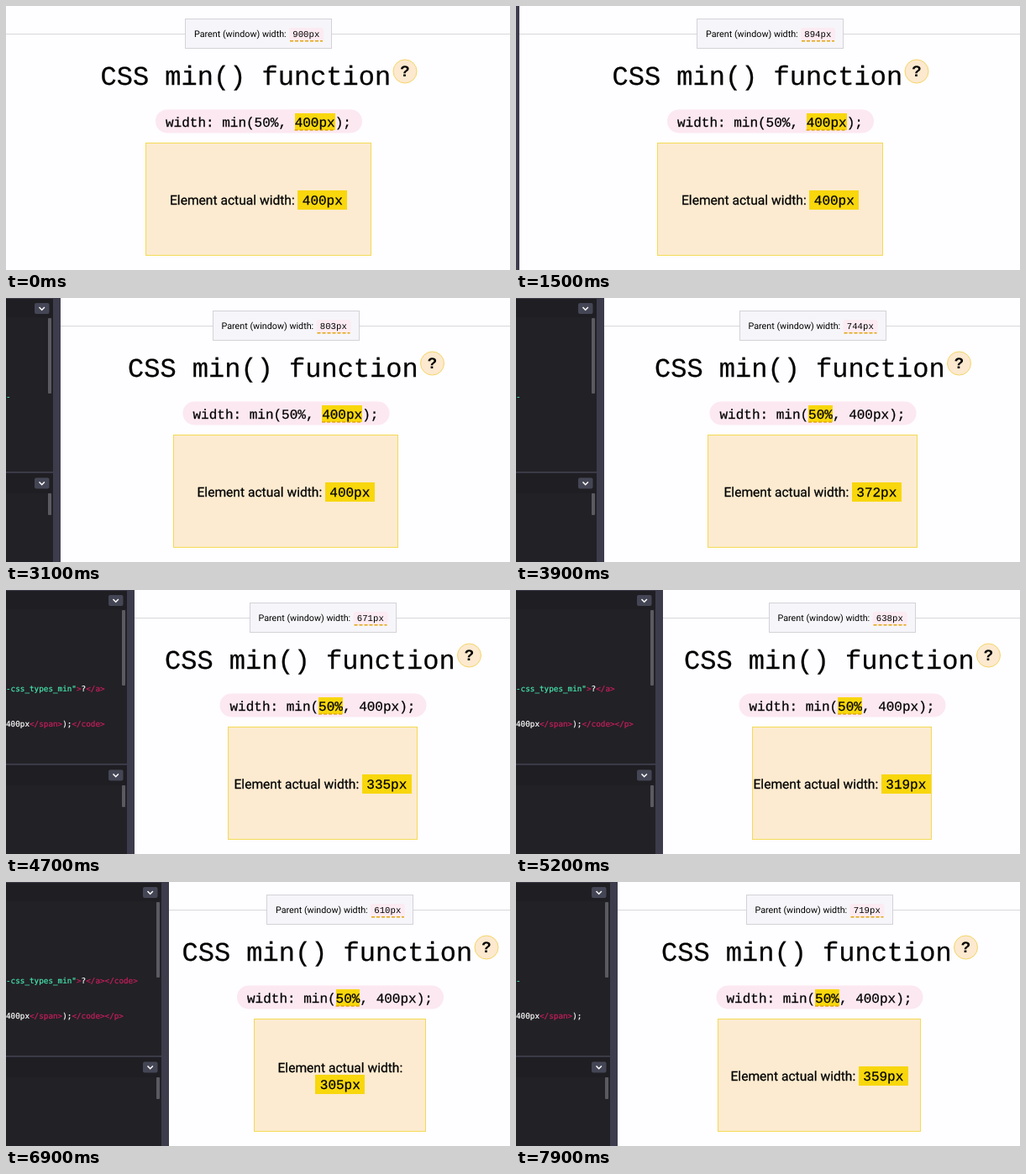
Write an HTML page that moves like this. It is 600 by 315 pixels and loops after 8000 ms.

```html
<!DOCTYPE html>
<html lang="en">
<head>
<meta charset="utf-8">
<title>CSS min() function</title>
<style>
  html, body { margin: 0; width: 100%; height: 100%; overflow: hidden; background: #fefdff; }
  svg { display: block; width: 600px; height: 315px; }
  text { fill: #000; white-space: pre; text-rendering: geometricPrecision; }
  .mono { font-family: "Liberation Mono", monospace; }
  .sans { font-family: Roboto, sans-serif; }
  .medium { stroke: #000; stroke-width: .25px; }
  .crisp { shape-rendering: crispEdges; }
  .source { font: 9.3px "DejaVu Sans Mono", monospace; stroke-width: .2px; }
  .source text { fill: #fff; stroke: #fff; }
  .source .tag { fill: #c81e5c; stroke: #c81e5c; }
  .source .string { fill: #47e8ae; stroke: #47e8ae; }
  .dash { stroke: #e2a60c; stroke-width: 1.6; stroke-dasharray: 4 2; }
</style>
</head>
<body>
<svg viewBox="0 0 600 315">
  <path id="rule" stroke="#d8d7dc"/>

  <!-- page content, centred in the window -->
  <g id="page">
    <rect class="crisp" x="213.5" y="15.5" width="174" height="35" fill="#f6f5f9" stroke="#d3d2d8"/>
    <text class="sans" x="224" y="37.3" font-size="10.75">Parent (window) width:</text>
    <rect x="337" y="26" width="41" height="16" rx="3" fill="#fcebf2"/>
    <path class="dash" d="M338 41.8H377"/>
    <text class="mono" id="parentWidth" x="341.3" y="37.3" font-size="10.67"></text>

    <text class="mono medium" x="112.5" y="93.5" font-size="32">CSS min() function</text>
    <circle cx="475" cy="78" r="14" fill="#fce9cf" stroke="#f4d668"/>
    <text class="mono" x="475" y="84" font-size="19" font-weight="bold" text-anchor="middle">?</text>

    <rect x="178" y="123.5" width="246" height="28" rx="14" fill="#fce8f1"/>
    <rect class="crisp" id="mark" y="128" height="20" fill="#f8d70c"/>
    <path id="markDash" class="dash"/>
    <text class="mono medium" x="190" y="143.5" font-size="16">width: min(50%, 400px);</text>

    <rect class="crisp" id="box" y="163.5" height="134" fill="#fcebd0" stroke="#f3da55"/>
    <text class="sans medium" id="label" font-size="15.6">Element actual width:</text>
    <g id="value">
      <rect class="crisp" width="59" height="23" fill="#f8d70c"/>
      <text class="mono medium" id="boxWidth" x="5.8" y="17" font-size="16"></text>
    </g>
  </g>

  <!-- editor, anchored to its right edge -->
  <g id="editor">
    <rect x="-300" width="291" height="315" fill="#222126"/>
    <rect x="-300" width="291" height="23" fill="#1f1e23"/>
    <rect x="-300" y="209" width="291" height="24" fill="#1f1e23"/>
    <rect x="-300" width="291" height="1" fill="#3b3a48"/>
    <rect x="-300" y="207" width="291" height="2" fill="#3b3a48"/>
    <rect x="-9" width="9" height="315" fill="#3d3c4c"/>
    <rect x="-15" y="24" width="4" height="90" rx="1" fill="#5b5a60"/>
    <rect x="-15" y="233" width="4" height="26" rx="1" fill="#5b5a60"/>
    <g id="button">
      <rect x="-31" y="6" width="17.5" height="13" rx="2" fill="#444655"/>
      <path d="M-25.5 11l3.2 3.2 3.2-3.2" fill="none" stroke="#fff" stroke-width="1.5"/>
    </g>
    <use href="#button" y="208.5"/>
  </g>
  <g class="source">
    <text id="line0" y="121.3"></text>
    <text id="line1" y="163.3"></text>
  </g>
</svg>
<script>
const SCALE = 2 / 3, LOOP = 8000, STEP = 100, CENTER = 300.5;
const $ = id => document.getElementById(id);
const set = (id, attrs) => {
  for (const [name, value] of Object.entries(attrs)) $(id).setAttribute(name, value);
};

// time in ms, window width in CSS pixels
const keys = [
  [0, 900], [800, 900], [1700, 891], [2300, 855], [2600, 832], [3500, 778],
  [3900, 743.7], [4400, 689], [4700, 670.8], [5300, 633], [5800, 619.4],
  [6250, 606], [6900, 610], [7100, 624], [7900, 718.8], [8000, 731]
];

const slope = i => (keys[i + 1][1] - keys[i][1]) / (keys[i + 1][0] - keys[i][0]);

// harmonic mean of the neighbouring slopes keeps the curve monotone
function tangent(i) {
  if (i === 0) return slope(0);
  if (i === keys.length - 1) return slope(i - 1);
  const a = slope(i - 1), b = slope(i);
  return a * b > 0 ? 2 * a * b / (a + b) : 0;
}

function windowWidth(t) {
  const i = keys.findIndex((key, n) => n + 1 === keys.length - 1 || t < keys[n + 1][0]);
  const [t0, w0] = keys[i], [t1, w1] = keys[i + 1];
  const d = t1 - t0, u = (t - t0) / d, v = 1 - u;
  return w0 * (1 + 2 * u) * v * v + w1 * u * u * (3 - 2 * u)
    + d * u * v * (tangent(i) * v - tangent(i + 1) * u);
}

// each line is a list of unbreakable chunks; a chunk is a list of [text, class]
const lines = [
  [[["-", "string"]], [['css_types_min"', "string"], [">", "tag"], ["?", ""]],
    [["</a>", "tag"]], [["</code>", "tag"]]],
  [[["400px", ""], ["</span>", "tag"], [");", ""]], [["</code>", "tag"]], [["</p>", "tag"]]]
];
const CHAR = 5.6, GUTTER = 29;

lines.forEach((chunks, row) => {
  let length = 0;
  for (const chunk of chunks) {
    chunk.spans = chunk.map(([text, name]) => {
      const span = document.createElementNS("http://www.w3.org/2000/svg", "tspan");
      span.textContent = text;
      span.setAttribute("class", name);
      $("line" + row).append(span);
      length += text.length;
      return span;
    });
    chunk.end = length * CHAR;
  }
});

function draw(t) {
  const width = windowWidth(t), left = Math.ceil(600 - width * SCALE);
  const element = Math.min(width / 2, 400);
  const half = width < 800;

  set("rule", { d: `M${left} 33.5H600` });
  set("page", { transform: `translate(${left / 2})` });
  set("editor", { transform: `translate(${left})` });

  $("parentWidth").textContent = Math.round(width) + "px";
  $("boxWidth").textContent = Math.round(element) + "px";

  const markX = half ? 295.6 : 343.6, markWidth = half ? 28.8 : 48;
  set("mark", { x: markX, width: markWidth });
  set("markDash", { d: `M${markX} 148h${markWidth}` });

  const boxWidth = element * SCALE + 1.3;
  set("box", { x: CENTER - boxWidth / 2, width: boxWidth });

  const wrapped = boxWidth < 212;
  set("label", wrapped ? { x: CENTER - 74, y: 227 } : { x: 195, y: 236.5 });
  set("value", { transform: wrapped ? `translate(${CENTER - 29.5} 229.6)` : "translate(347 219.6)" });

  for (const chunk of lines.flat())
    for (const span of chunk.spans)
      span.style.display = chunk.end <= left - GUTTER ? "" : "none";
}

const start = performance.now();
function frame() {
  const t = (performance.now() - start) % LOOP;
  draw(Math.floor(t / STEP) * STEP);
  requestAnimationFrame(frame);
}
frame();
</script>
</body>
</html>
```
